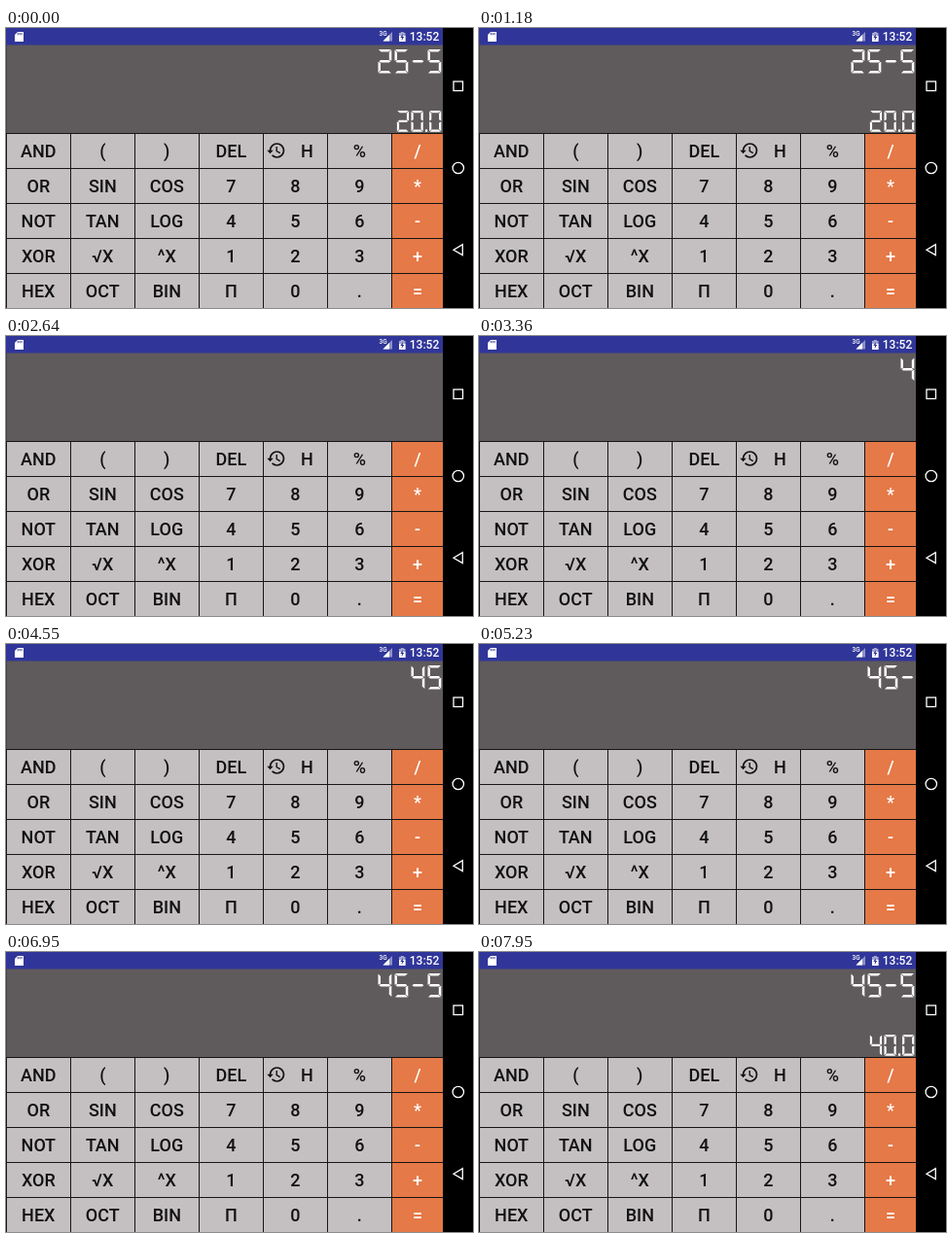
An HTML page with a canvas for the animation above (8 s loop, 480x288 px).

```html
<!DOCTYPE html>
<html lang="en">
<head>
<meta charset="utf-8">
<title>Calculator</title>
<style>
html, body { margin: 0; width: 100%; height: 100%; overflow: hidden; background: #000; }
canvas { display: block; width: 480px; height: 288px; }
</style>
</head>
<body>
<canvas id="stage" width="480" height="288"></canvas>
<script>
const ctx = document.getElementById('stage').getContext('2d');
const LOOP = 8000;
const FONT = 'Roboto, "Noto Sans", sans-serif';

const KEYS = [
  ['AND', '(', ')', 'DEL', 'H', '%', '/'],
  ['OR', 'SIN', 'COS', '7', '8', '9', '*'],
  ['NOT', 'TAN', 'LOG', '4', '5', '6', '-'],
  ['XOR', '√X', '^X', '1', '2', '3', '+'],
  ['HEX', 'OCT', 'BIN', 'П', '0', '.', '=']
];

// Start time, expression, result
const STATES = [
  [0, '25-5', '20.0'],
  [2090, '', ''],
  [3240, '4', ''],
  [3960, '45', ''],
  [4830, '45-', ''],
  [5530, '45-5', ''],
  [7080, '45-5', '40.0']
];

// Lit segments: a top, b/c right, d bottom, e/f left, g middle
const SEGMENTS = { 0: 'abcdef', 2: 'abged', 4: 'fgbc', 5: 'afgcd', '-': 'g' };

function rect(x, y, w, h, color) {
  ctx.fillStyle = color;
  ctx.fillRect(x, y, w, h);
}

function poly(points, color) {
  ctx.beginPath();
  points.forEach(([x, y]) => ctx.lineTo(x, y));
  ctx.closePath();
  ctx.fillStyle = color;
  ctx.fill();
}

function label(str, x, y, size, color, weight = 500) {
  ctx.font = `${weight} ${size}px ${FONT}`;
  ctx.textAlign = 'center';
  ctx.fillStyle = color;
  ctx.fillText(str, x, y);
}

function drawDigit(ch, x, y, w, h) {
  const t = w * 0.18, g = 0.45, m = h / 2;
  const shapes = {
    a: [[g, 0], [w - g, 0], [w - t - g, t], [t + g, t]],
    d: [[g, h], [w - g, h], [w - t - g, h - t], [t + g, h - t]],
    g: [[g + 0.5, m], [t, m - t / 2], [w - t, m - t / 2], [w - g - 0.5, m], [w - t, m + t / 2], [t, m + t / 2]],
    f: [[0, g], [t, t + g], [t, m - t / 2 - g], [0, m - g]],
    e: [[0, h - g], [t, h - t - g], [t, m + t / 2 + g], [0, m + g]],
    b: [[w, g], [w - t, t + g], [w - t, m - t / 2 - g], [w, m - g]],
    c: [[w, h - g], [w - t, h - t - g], [w - t, m + t / 2 + g], [w, m + g]]
  };
  for (const s of SEGMENTS[ch]) poly(shapes[s].map(p => [p[0] + x, p[1] + y]), '#fff');
}

// Right-aligned seven-segment number
function readout(str, right, top, w, h, pitch) {
  let x = right;
  for (const ch of [...str].reverse()) {
    if (ch === '.') {
      rect(x + pitch - w - 4.2, top + h - 2.4, 2.3, 2.4, '#fff');
      x -= 4;
    } else {
      drawDigit(ch, x - w, top, w, h);
      x -= pitch;
    }
  }
}

function drawStatus() {
  rect(0, 0, 449, 17.5, '#303699');
  poly([[12, 4], [18, 4], [18, 14], [9, 14], [9, 7]], '#fff');
  for (let i = 0; i < 3; i++) rect(11.8 + i * 1.9, 5, 0.9, 2.2, '#303699');
  label('3G', 387.5, 8, 6.5, '#fff');
  poly([[397, 4], [397, 13.5], [387.5, 13.5]], '#8e92c8');
  poly([[394, 7], [394, 13.5], [387.5, 13.5]], '#fff');
  rect(404, 5, 6.5, 9, '#a4a7d2');
  rect(405.8, 4, 3, 1, '#a4a7d2');
  rect(404, 8, 6.5, 6, '#fff');
  poly([[407.9, 6], [405.3, 10], [407, 10], [406.6, 13], [409.3, 9], [407.7, 9]], '#303699');
  label('13:52', 430, 13.2, 12, '#fff');
}

function drawNav() {
  rect(449, 0, 31, 288, '#000');
  ctx.strokeStyle = '#fff';
  ctx.lineWidth = 1.3;
  ctx.strokeRect(460, 55, 9.5, 9.5);
  ctx.beginPath();
  ctx.arc(464.8, 144, 5.7, 0, Math.PI * 2);
  ctx.stroke();
  ctx.beginPath();
  ctx.moveTo(469.3, 222.7);
  ctx.lineTo(469.3, 233.6);
  ctx.lineTo(460, 228.2);
  ctx.closePath();
  ctx.stroke();
}

function drawHistory(x, y) {
  ctx.strokeStyle = '#111';
  ctx.lineWidth = 1.7;
  ctx.beginPath();
  ctx.arc(x, y, 7, -Math.PI, Math.PI * 0.75);
  ctx.stroke();
  ctx.lineWidth = 1.4;
  ctx.beginPath();
  ctx.moveTo(x - 0.3, y - 4);
  ctx.lineTo(x - 0.3, y + 0.5);
  ctx.lineTo(x + 3.2, y + 2.6);
  ctx.stroke();
  poly([[x - 10.2, y - 0.3], [x - 3.8, y - 0.3], [x - 7, y + 3.2]], '#111');
}

function drawKeys() {
  rect(0, 108, 449, 180, '#171516');
  KEYS.forEach((row, r) => row.forEach((key, c) => {
    const op = c === 6;
    const x = c * 66 + 1, y = r * 36 + 109;
    rect(x, y, op ? 52 : 65, 35, op ? '#e57947' : '#c4bfc0');
    const cx = op ? 423 : key === 'H' ? 309.5 : x + 32.3;
    label(key, cx, y + 24.4, 18, op ? '#fff' : '#111');
  }));
  drawHistory(278.5, 126);
}

function draw(time) {
  const [, expr, result] = STATES.filter(s => s[0] <= time).pop();
  rect(0, 17, 449, 91, '#5f5a5c');
  rect(0, 17, 1, 91, '#484446');
  drawStatus();
  drawKeys();
  drawNav();
  readout(expr, 447.3, 22, 13.8, 24.5, 17);
  readout(result, 447.3, 85, 12.2, 21.8, 14.6);
}

const start = performance.now();
function tick() {
  draw((performance.now() - start) % LOOP);
  requestAnimationFrame(tick);
}
tick();
</script>
</body>
</html>
```
